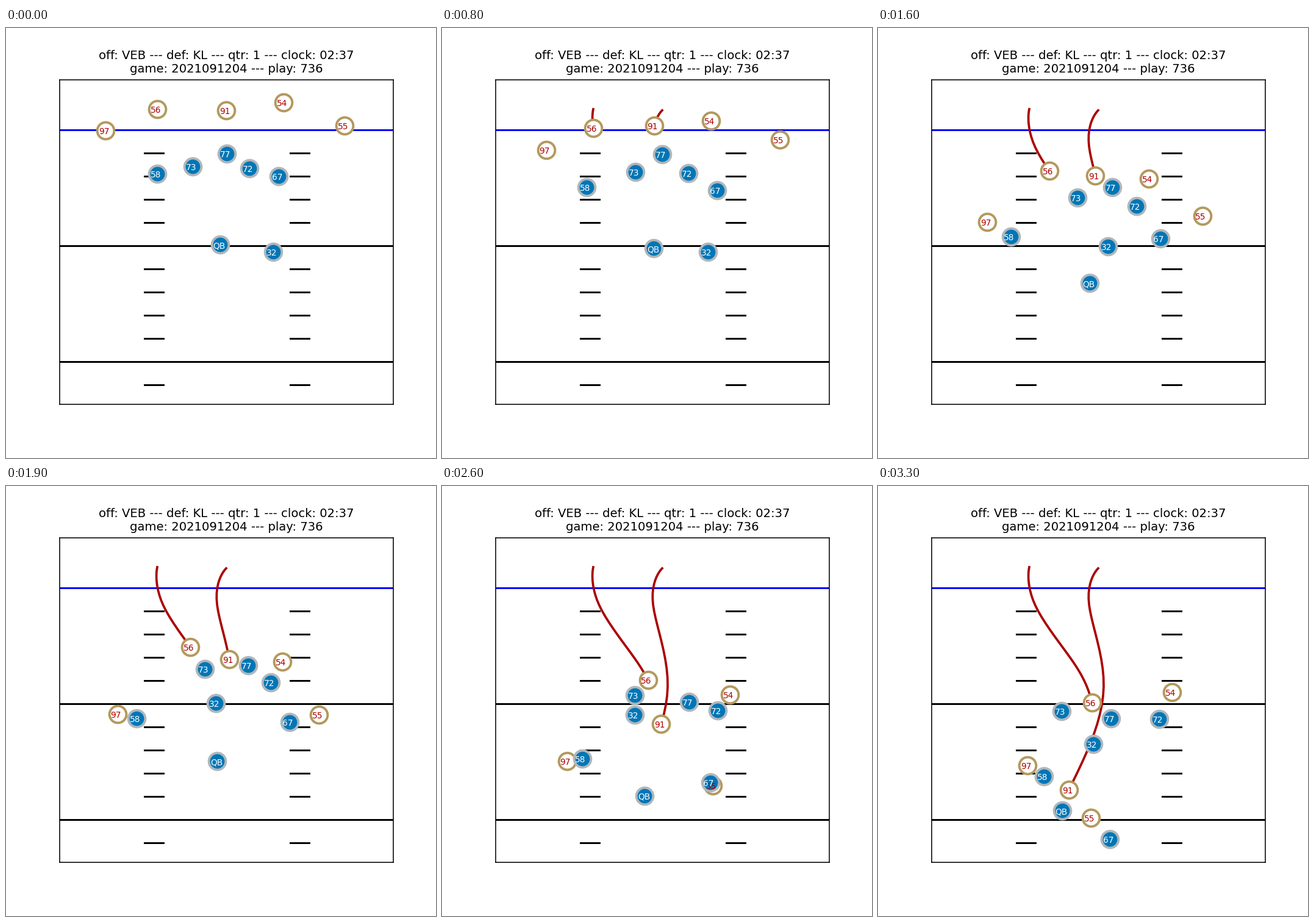
A matplotlib script that plays this animation: 705 px wide and 705 px high, repeating every 3400 ms.

```python
import matplotlib.pyplot as plt
import numpy as np
from matplotlib.animation import FuncAnimation

FRAMES, STEP = 34, 100
SIZE, DPI = 705, 141
LEFT, RIGHT, TOP, BOTTOM = 88.125, 634.5, 84.6, 616.875
RED, GOLD, BLUE, SILVER = "#AA0000", "#B3995D", "#0076B6", "#B0B7BC"

# Each route in stage pixels: stance, first contact, pocket, end of play
KEYS = np.array([0, 12, 22, 33])
DEFENSE = {
    "97": [(163, 168), (176, 248), (189, 419), (245, 458)],
    "56": [(248, 133), (258, 196), (321, 290), (351, 355)],
    "91": [(361, 135), (346, 194), (370, 329), (313, 498)],
    "54": [(455, 122), (437, 192), (463, 321), (482, 338)],
    "55": [(555, 160), (547, 229), (488, 435), (349, 544)],
}
OFFENSE = {
    "58": [(248, 239), (227, 293), (216, 416), (272, 476)],
    "73": [(306, 227), (324, 252), (323, 321), (301, 369)],
    "77": [(362, 206), (368, 224), (406, 325), (382, 381)],
    "72": [(399, 230), (412, 258), (443, 347), (461, 382)],
    "67": [(447, 243), (456, 298), (460, 430), (380, 579)],
    "QB": [(351, 355), (346, 381), (343, 481), (302, 532)],
    "32": [(438, 367), (417, 364), (321, 359), (353, 423)],
}
RUSHERS = ["56", "91"]


def run(route):
    """Smooth run along a route: a cubic spline that starts from rest."""
    p, t = np.array(route, float), np.arange(FRAMES)
    n, h = len(p), np.diff(KEYS)
    d = np.diff(p, axis=0) / h[:, None]
    a, b = np.eye(n), np.zeros_like(p)
    for i in range(1, n - 1):
        a[i, i - 1:i + 2] = h[i], 2 * (h[i - 1] + h[i]), h[i - 1]
        b[i] = 3 * (h[i] * d[i - 1] + h[i - 1] * d[i])
    a[-1, -2:] = 1, 2
    b[-1] = 3 * d[-1]
    v = np.linalg.solve(a, b)
    i = np.clip(np.searchsorted(KEYS, t, "right") - 1, 0, n - 2)
    w = h[i][:, None]
    s = (t - KEYS[i])[:, None] / w
    ease = s * s * (3 - 2 * s)
    return (p[i] * (1 - ease) + p[i + 1] * ease
            + w * s * (1 - s) * (v[i] * (1 - s) - v[i + 1] * s))


fig = plt.figure(figsize=(SIZE / DPI, SIZE / DPI), dpi=DPI, facecolor="white")
ax = fig.add_axes([0.125, 0.125, 0.775, 0.755])
ax.set(xlim=(LEFT, RIGHT), ylim=(BOTTOM, TOP), xticks=[], yticks=[])
ax.set_title("off: VEB --- def: KL --- qtr: 1 --- clock: 02:37\n"
             "game: 2021091204 --- play: 736",
             fontsize=10, fontfamily="DejaVu Sans")

# Field markings
for yard in range(12):
    y = 166.6 + 38 * yard
    if yard % 5 == 0:
        ax.axhline(y, color="black" if yard else "blue", lw=1.5, zorder=1)
    else:
        for x in (242.4, 481.3):
            ax.plot([x - 15.5, x + 15.5], [y, y], color="black", lw=1.5, zorder=1)


def add_team(team, fill, edge, ink, z):
    paths = {name: run(route) for name, route in team.items()}
    dots = ax.scatter([0] * len(team), [0] * len(team), s=200, c=fill,
                      edgecolors=edge, linewidths=2, zorder=z)
    labels = [ax.text(0, 0, name, color=ink, fontsize=7, zorder=6,
                      fontfamily="DejaVu Sans") for name in team]
    return paths, dots, labels


teams = [add_team(DEFENSE, "white", GOLD, RED, 4),
         add_team(OFFENSE, BLUE, SILVER, "white", 5)]
trails = {name: ax.plot([], [], color=RED, lw=1.9, zorder=3)[0]
          for name in RUSHERS}


def update(frame):
    for paths, dots, labels in teams:
        spots = np.array([p[frame] for p in paths.values()])
        dots.set_offsets(spots)
        for label, (x, y) in zip(labels, spots):
            label.set_position((x - 11.3, y + 6))
    for name, line in trails.items():
        line.set_data(*teams[0][0][name][:frame + 1].T)


anim = FuncAnimation(fig, update, frames=FRAMES, init_func=lambda: update(0),
                     interval=STEP, repeat=True, repeat_delay=0)
plt.show()
```
